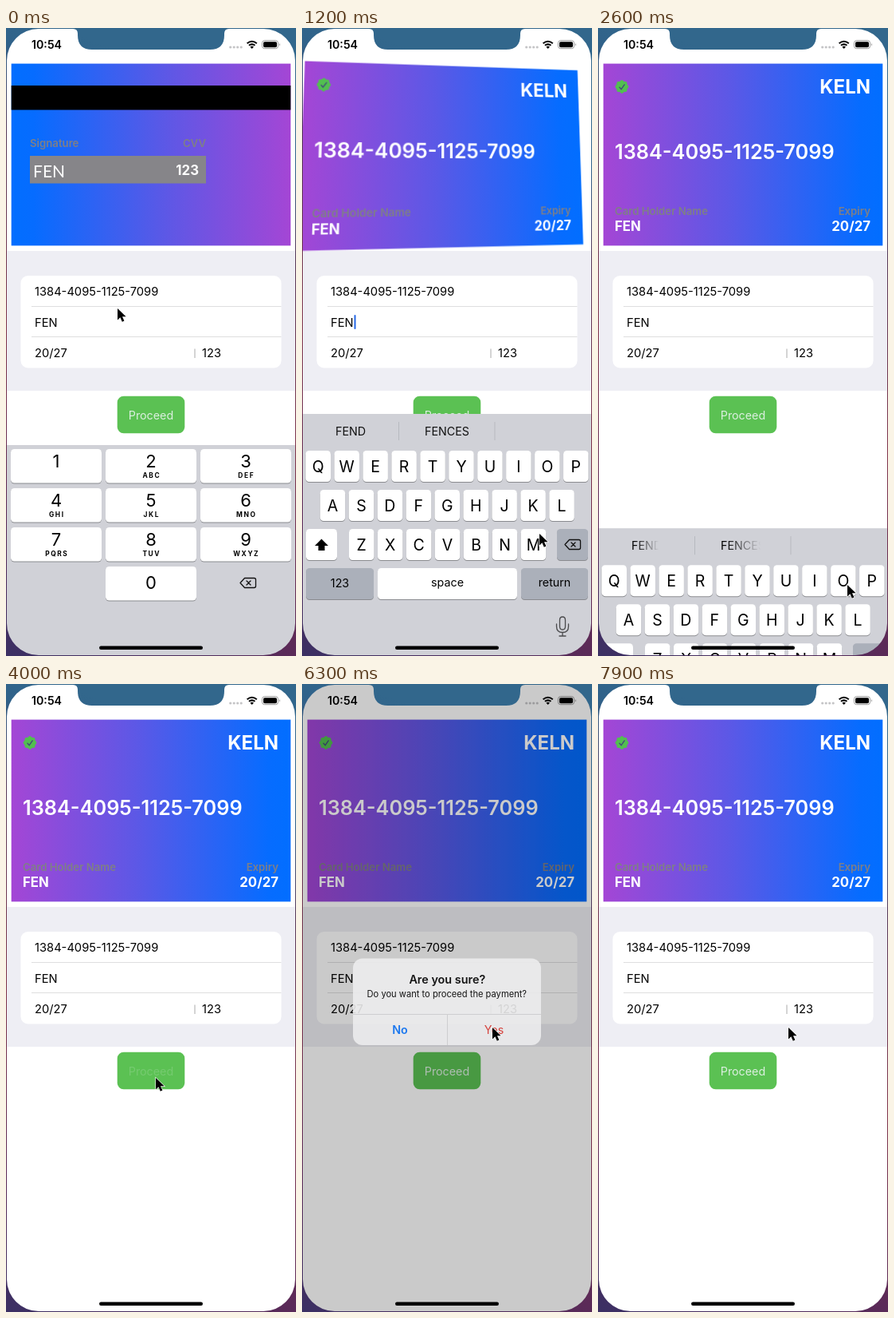
Recreate the animation shown at these times as an HTML page. Size 364 by 786 pixels, loop 8 s.

```html
<!DOCTYPE html>
<html lang="en">
<head>
<meta charset="utf-8">
<title>Card payment form</title>
<style>
  html, body { margin: 0; width: 100%; height: 100%; overflow: hidden; background: #fff; }
  svg { position: absolute; left: 0; top: 0; width: 364px; height: 786px; font-family: Inter, "Liberation Sans", sans-serif; }
  #card { left: 7px; top: 45px; width: 350px; height: 227px; overflow: visible; }
  .mid { text-anchor: middle; }
  .end { text-anchor: end; }
  .body { font-size: 14.7px; }
  .label { font-size: 13.2px; font-weight: 600; fill: #7f7f86; }
  .value { font-size: 16.8px; font-weight: 700; fill: #fff; }
  .btn { font-size: 14.3px; }
  .digit { font-size: 22px; }
  .sub { font-size: 8.4px; font-weight: 700; letter-spacing: 1.6px; }
  .letter { font-size: 19.5px; }
  .line { fill: none; stroke: #111; stroke-width: 1.3; stroke-linecap: round; stroke-linejoin: round; }
</style>
</head>
<body>
<svg viewBox="0 0 364 786">
  <rect width="364" height="786" fill="#fff"/>
  <rect y="279" width="364" height="175" fill="#eeeef4"/>
  <rect x="18.5" y="310" width="327" height="115.500" rx="9" fill="#fff"/>
  <path d="M32 348.500H345.500M32 386.500H345.500" stroke="#dededf"/>
  <path d="M237 401.500V413" stroke="#aaa"/>
  <g class="body">
    <text x="36" y="335">1384-4095-1125-7099</text>
    <text x="36" y="373.500">FEN</text>
    <text x="36" y="412">20/27</text>
    <text x="246" y="412">123</text>
  </g>
  <rect id="caret" x="65.500" y="359" width="2" height="18" rx="1" fill="#2467e6"/>
  <rect x="139.700" y="460.700" width="84.600" height="46.600" rx="8" fill="#5bc153"/>
  <text id="proceed" class="btn mid" x="182" y="489.500" fill="#dcefe0">Proceed</text>
</svg>

<svg id="card" viewBox="7 45 350 227">
  <defs>
    <linearGradient id="sheen">
      <stop stop-color="#a446d5"/><stop offset=".45" stop-color="#5c58e6"/><stop offset=".92" stop-color="#066cff"/><stop offset="1" stop-color="#026eff"/>
    </linearGradient>
  </defs>
  <rect x="6.700" y="44.600" width="350.600" height="227.800" fill="url(#sheen)"/>
  <g id="front">
    <g fill="#52bf50">
      <rect x="23.500" y="67" width="13" height="13" rx="2"/>
      <rect x="23.500" y="67" width="13" height="13" rx="2" transform="rotate(45 30 73.500)"/>
    </g>
    <path d="M27 74.200l2.200 2.500 4-5.800" fill="none" stroke="#40477c" stroke-width="1.300" stroke-linecap="round"/>
    <text class="end" x="342" y="82" font-size="24" font-weight="700" fill="#fff">KELN</text>
    <text x="21" y="163.500" font-size="25.300" font-weight="600" fill="#fff">1384-4095-1125-7099</text>
    <text class="label" x="21" y="234">Card Holder Name</text>
    <text class="value" x="21" y="254">FEN</text>
    <text class="label end" x="342" y="234">Expiry</text>
    <text class="value end" x="342" y="254">20/27</text>
  </g>
  <g id="back" transform="translate(364) scale(-1 1)">
    <rect x="6.700" y="72" width="350.600" height="30.500"/>
    <text class="label" x="30" y="149">Signature</text>
    <text class="label end" x="251" y="149">CVV</text>
    <rect x="30" y="160" width="221" height="34.500" fill="#868589"/>
    <text x="34" y="186.500" font-size="21" fill="#fff" font-family="Lato, sans-serif">FEN</text>
    <text class="value end" x="242" y="183.500">123</text>
  </g>
</svg>

<svg viewBox="0 0 364 786">
  <defs>
    <linearGradient id="wall" x1=".2" x2="0" y2="1">
      <stop stop-color="#32678c"/><stop offset=".06" stop-color="#30628a"/><stop offset=".2" stop-color="#593a58"/>
      <stop offset=".5" stop-color="#81344a"/><stop offset=".8" stop-color="#5b2a58"/><stop offset="1" stop-color="#3b3064"/>
    </linearGradient>
    <linearGradient id="fade"><stop offset=".1"/><stop offset=".9" stop-opacity="0"/></linearGradient>
  </defs>
  <g id="pad"></g>
  <g id="qwerty"></g>

  <text x="32" y="26" font-size="14.200" font-weight="600">10:54</text>
  <g fill="#c4c4c6">
    <circle cx="281.700" cy="24" r="1.600"/><circle cx="286.200" cy="24" r="1.600"/>
    <circle cx="290.700" cy="24" r="1.600"/><circle cx="295.200" cy="24" r="1.600"/>
  </g>
  <path d="M302.600 19.200q6.100-4.800 12.200 0M304.900 21.800q3.800-2.900 7.600 0" fill="none" stroke="#000" stroke-width="2"/>
  <path d="M306.400 23.600q2.300-1.500 4.600 0L308.700 26z"/>
  <rect x="321.500" y="15.700" width="20" height="10" rx="3" fill="none" stroke="#999"/>
  <rect x="323" y="17.200" width="17" height="7" rx="1.700"/>
  <path d="M343 19v3.500q2-1.700 0-3.500" fill="#999"/>

  <rect id="dim" width="364" height="786"/>
  <rect x="117" y="773.500" width="130" height="4.500" rx="2.200"/>

  <g id="alert">
    <rect x="64" y="343.500" width="236" height="108.500" rx="12" fill="#ededee"/>
    <path d="M64 413.500H300M182.500 413.500V452" stroke="#cfcfd1"/>
    <text class="mid" x="182.300" y="374.500" font-size="14.400" font-weight="600">Are you sure?</text>
    <text class="mid" x="181.800" y="392" font-size="11.150">Do you want to proceed the payment?</text>
    <text class="mid btn" x="123" y="438" font-weight="600" fill="#0a70f5">No</text>
    <text class="mid btn" x="241" y="438" fill="#d9342e">Yes</text>
  </g>

  <path fill="url(#wall)" fill-rule="evenodd" d="M0 0H364V786H0zM41 1H84q6 0 6 6v2q0 18 18 18H256q18 0 18-18v-2q0-6 6-6H323a40 40 0 0 1 40 40V745a40 40 0 0 1-40 40H41a40 40 0 0 1-40-40V41a40 40 0 0 1 40-40z"/>
  <path id="mouse" d="M0 0V14.500l3.400-3.200 2.400 5.400 2.600-1.100-2.400-5.300h4.600z" stroke="#fff" stroke-width="1.200" paint-order="stroke"/>
</svg>

<script>
const $ = id => document.getElementById(id);
const WHITE = '#fff', GREY = '#abb0ba';

// Keyboards
const text = (x, y, cls, s) => `<text class="mid ${cls}" x="${x}" y="${y}">${s}</text>`;
const key = (x, y, w, h, fill = WHITE) =>
  `<rect x="${x}" y="${y + 1}" width="${w}" height="${h}" rx="4.5" fill="#8a8b8f"/>` +
  `<rect x="${x}" y="${y}" width="${w}" height="${h}" rx="4.5" fill="${fill}"/>`;
const panel = y => `<rect y="${y}" width="364" height="${786 - y}" fill="#d0d1d7"/>`;
const erase = (x, y) =>
  `<path class="line" transform="translate(${x} ${y})" d="M-10 0l5.500-6h12q2 0 2 2v8q0 2-2 2h-12zM-2 -2.500l5 5m0-5l-5 5"/>`;

const groups = ['', 'ABC', 'DEF', 'GHI', 'JKL', 'MNO', 'PQRS', 'TUV', 'WXYZ'];
$('pad').innerHTML = panel(522) + groups.map((s, i) => {
  const x = 6 + i % 3 * 119, y = 527 + Math.floor(i / 3) * 49;
  return key(x, y, 114, 42.5) + text(x + 57, y + 23, 'digit', i + 1) + text(x + 57.8, y + 35.5, 'sub', s);
}).join('') + key(125, 674, 114, 42.5) + text(182, 702, 'digit', 0) + erase(304, 694.5);

const row = (letters, x0, y) => [...letters].map((c, i) => {
  const x = x0 + i * 35.95;
  return key(x, y, 31.5, 39) + text(x + 15.75, y + 26.5, 'letter', c);
}).join('');
$('qwerty').innerHTML = panel(483) +
  `<g id="hints">${text(61, 510, 'btn', 'FEND')}${text(182, 510, 'btn', 'FENCES')}</g>` +
  '<path d="M121.500 493V516M242 493V516" stroke="#b7b9bf"/>' +
  row('QWERTYUIOP', 4.5, 529) + row('ASDFGHJKL', 22.7, 578) + row('ZXCVBNM', 59, 627) +
  key(5, 627, 39, 39) + '<path d="M24.500 639.500l8.500 8.500h-4.500v6h-8v-6h-4.500z"/>' +
  key(320, 627, 39, 39, GREY) + erase(340, 646.5) +
  key(5, 676, 85, 39, GREY) + key(95, 676, 175, 39) + key(275, 676, 84, 39, GREY) +
  text(47.5, 700, 'btn', '123') + text(182.5, 699, 'btn', 'space') + text(317, 699, 'btn', 'return') +
  '<path class="line" stroke-opacity=".7" d="M323.500 741q0-4 3.500-4t3.500 4v8q0 4-3.500 4t-3.500-4zM319.500 746v3q0 7.500 7.500 7.500t7.500-7.500v-3M327 756.500v4.500m-4 0h8"/>';

// Timing
const ramp = (t, start, span) => Math.min(1, Math.max(0, (t - start) / span));
const ease = p => p < .5 ? 4 * p ** 3 : 1 - 4 * (1 - p) ** 3;
const smooth = p => p * p * (3 - 2 * p);

// Pointer stops: time, x, y
const stops = [
  [0, 140, 351], [450, 146, 364], [700, 146, 364], [1200, 298, 633], [1500, 313, 697],
  [2700, 313, 697], [3500, 188, 493], [4250, 188, 493], [4900, 219.5, 441], [5500, 239, 430], [8000, 239, 430]
];
function pointer(t) {
  const i = stops.findIndex(s => s[0] > t);
  const [t0, x0, y0] = stops[i - 1], [t1, x1, y1] = stops[i];
  const p = smooth((t - t0) / (t1 - t0));
  return `translate(${x0 + (x1 - x0) * p} ${y0 + (y1 - y0) * p})`;
}

const show = (id, on) => { $(id).style.display = on ? '' : 'none'; };

function draw(t) {
  const angle = 180 * (1 - ease(ramp(t, 700, 618)));
  const tilt = .82 * angle * (1 - angle / 180);
  $('card').style.transform = angle ? `perspective(350px) rotateX(${tilt}deg) rotateY(${angle}deg)` : 'none';
  show('front', angle < 90);
  show('back', angle >= 90);

  const swap = smooth(ramp(t, 600, 250)), slide = ease(ramp(t, 2443, 320));
  show('pad', swap < 1);
  show('qwerty', swap > 0 && slide < 1);
  $('qwerty').setAttribute('opacity', swap);
  $('qwerty').setAttribute('transform', `translate(0 ${39 * (1 - swap) + 303 * slide})`);
  $('hints').setAttribute('fill', slide > 0 ? 'url(#fade)' : '#111');
  show('caret', t >= 600 && t < 2450);

  const press = ramp(t, 3850, 100) - ramp(t, 4100, 250);
  $('proceed').setAttribute('opacity', 1 - .8 * press);

  const enter = smooth(ramp(t, 4150, 300)), leave = smooth(ramp(t, 6240, 300));
  const shown = enter * (1 - leave);
  show('alert', shown > 0);
  $('alert').setAttribute('opacity', shown);
  $('alert').setAttribute('transform', `translate(182 398) scale(${1.2 - .2 * enter}) translate(-182 -398)`);
  $('dim').setAttribute('opacity', .23 * shown);

  $('mouse').setAttribute('transform', pointer(t));
}

function tick() {
  draw(Math.floor(performance.now() % 8000 / 100) * 100);
  requestAnimationFrame(tick);
}
tick();
</script>
</body>
</html>
```
